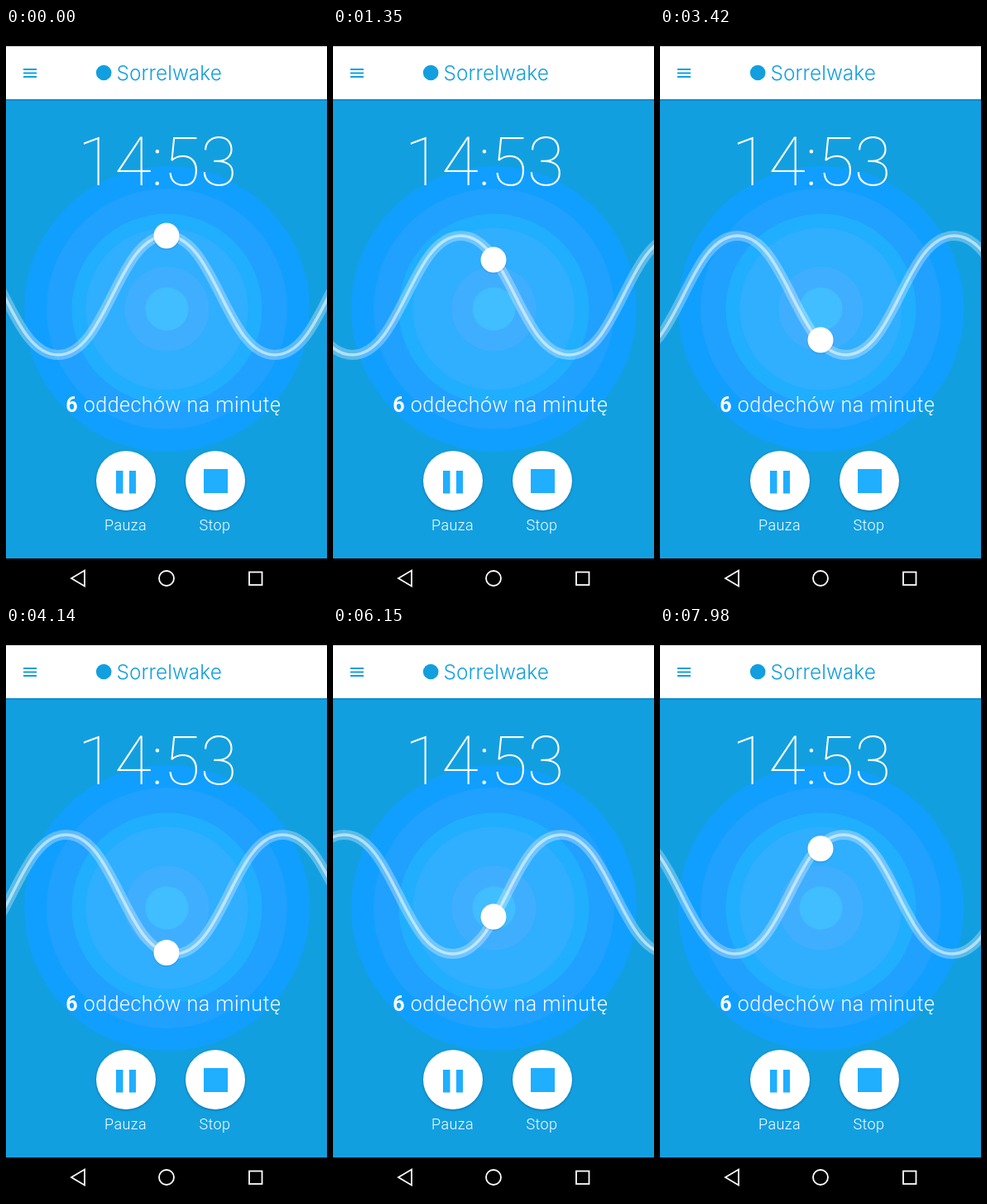
Animation, 388 px wide and 690 px high, one loop 8 s. Source, as an HTML page:

```html
<!DOCTYPE html>
<html lang="pl">
<head>
<meta charset="utf-8">
<title>Sorrelwake</title>
<style>
  html, body { margin: 0; width: 100%; height: 100%; overflow: hidden; background: #000; }
  svg { display: block; width: 100%; height: 100%; }
  text { font-family: Roboto, sans-serif; font-weight: 300; fill: #fff; }
  .brand { font: 300 24.5px Inter, sans-serif; fill: #129fe0; }
  .clock { font-size: 81.5px; font-weight: 100; }
  .rate { font-size: 25px; letter-spacing: .5px; }
  .rate tspan { font-weight: 700; }
  .label { font-size: 18px; letter-spacing: .4px; }
  .button { fill: #fff; filter: drop-shadow(0 1.5px 1.5px rgba(0, 40, 80, .4)); }
  .icon { fill: #20aeff; }
  .line { fill: none; stroke: #fff; }
</style>
</head>
<body>
<svg viewBox="0 0 388 690">
  <rect y="22" width="388" height="619" fill="#129fe0"/>
  <g id="rings"></g>

  <g id="wave" class="line">
    <path stroke-width="12" stroke-opacity=".3"/>
    <path stroke-width="3.6" stroke-opacity=".55"/>
  </g>
  <g id="ball">
    <circle r="16.3" cy="1" fill="#003c78" opacity=".12"/>
    <circle r="15.5" fill="#fff"/>
  </g>

  <rect y="86" width="388" height="2" fill="#00508c" opacity=".22"/>
  <rect y="22" width="388" height="64" fill="#fff"/>
  <path d="M21 50H37M21 54.5H37M21 59H37" stroke="#129fe0" stroke-width="1.8"/>
  <circle cx="118.2" cy="54" r="9.3" fill="#129fe0"/>
  <text class="brand" x="133.5" y="63">Sorrelwake</text>

  <text class="clock" x="183" y="189.5" text-anchor="middle">14:53</text>
  <text class="rate" x="72.3" y="464"><tspan>6</tspan> oddechów na minutę</text>

  <circle class="button" cx="145" cy="547" r="36"/>
  <path class="icon" d="M133 535h8.5v27.500h-8.500zM149 535h8v27.500h-8z"/>
  <text class="label" x="144.500" y="607" text-anchor="middle">Pauza</text>
  <circle class="button" cx="253" cy="547" r="36"/>
  <path class="icon" d="M239 533h29v29h-29z"/>
  <text class="label" x="252.500" y="607" text-anchor="middle">Stop</text>

  <rect y="641" width="388" height="49"/>
  <g class="line" stroke-width="1.8">
    <path d="M79 665L95 655.500V674.500Z"/>
    <circle cx="194" cy="665" r="9"/>
    <rect x="294" y="657.500" width="15.500" height="15.500"/>
  </g>
</svg>
<script>
const LOOP = 8000, STEP = 30;
const MID_X = 194, TOP = 251, BOTTOM = 395;
const WAVE = 262, WAVE_MS = 8930, HANDLE = 0.45;
const DOWN = [50, 4430], UP = [4430, 8990];

const wave = document.getElementById('wave');
const ball = document.getElementById('ball');

document.getElementById('rings').innerHTML = [
  [172.5, '#109fff'], [145.5, '#20a0ff'], [115, '#20aeff'],
  [98, '#30aeff'], [51, '#40aeff'], [26, '#40beff']
].map(([r, fill]) => `<circle cx="194.5" cy="339.5" r="${r}" fill="${fill}"/>`).join('');

function wavePath() {
  const half = WAVE / 2, reach = half * HANDLE;
  let d = `M${-WAVE} ${TOP}`;
  for (let i = -2; i < 4; i++) {
    const x = i * half;
    const [a, b] = i % 2 ? [BOTTOM, TOP] : [TOP, BOTTOM];
    d += `C${x + reach} ${a} ${x + half - reach} ${b} ${x + half} ${b}`;
  }
  return d;
}

// Sine ease in and out over a time span
function ease(t, [start, end]) {
  const p = Math.min(1, Math.max(0, (t - start) / (end - start)));
  return (1 - Math.cos(Math.PI * p)) / 2;
}

function draw(t) {
  const y = TOP + (BOTTOM - TOP) * (ease(t, DOWN) - ease(t, UP));
  wave.setAttribute('transform', `translate(${MID_X - WAVE * t / WAVE_MS} 0)`);
  ball.setAttribute('transform', `translate(${MID_X} ${y})`);
}

const d = wavePath();
for (const path of wave.children) path.setAttribute('d', d);

const begin = performance.now();
function tick() {
  const t = (performance.now() - begin) % LOOP;
  draw(Math.floor(t / STEP) * STEP);
  requestAnimationFrame(tick);
}
tick();
</script>
</body>
</html>
```
